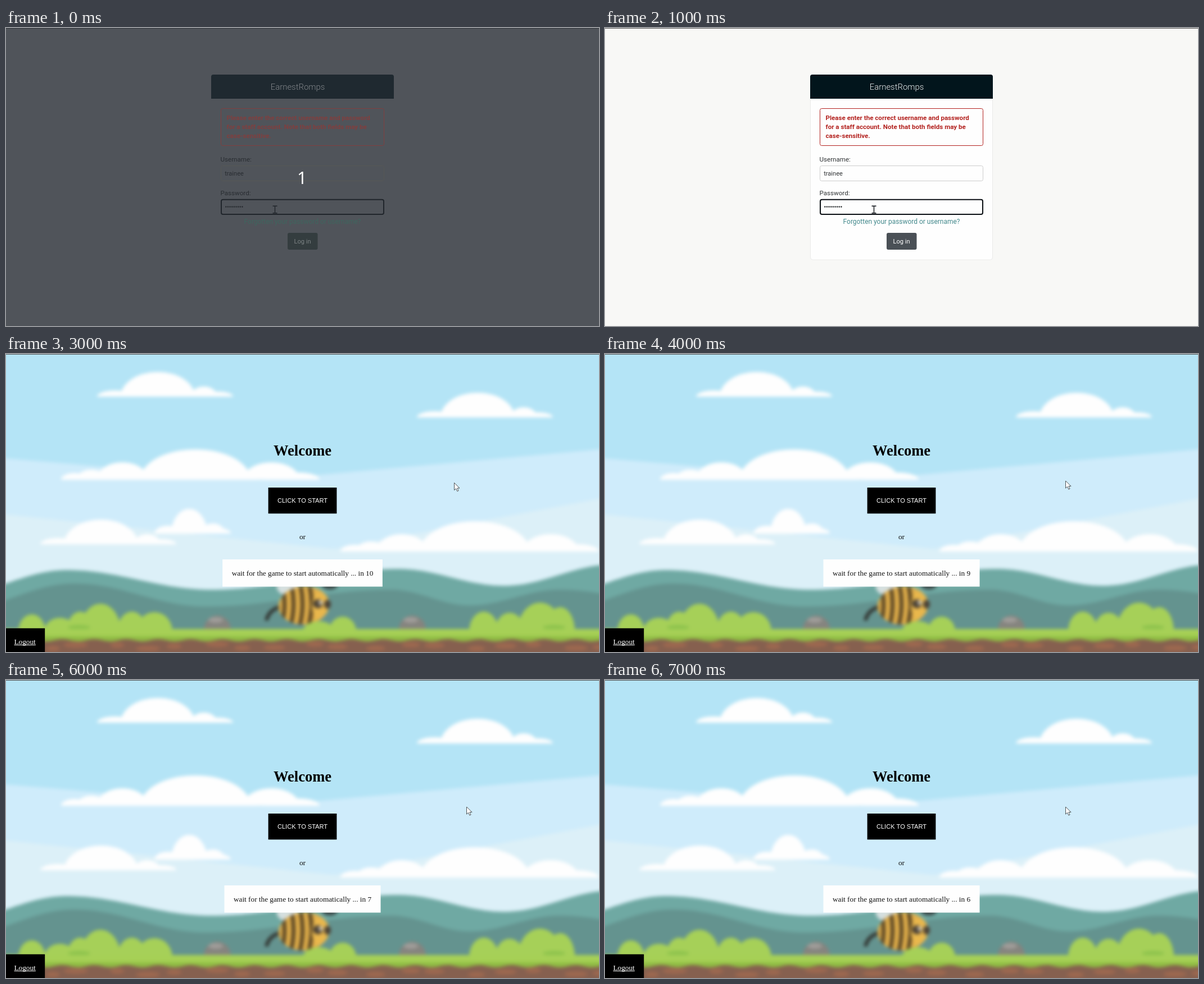
An HTML page with a canvas for the animation above (8000 ms loop, 1055x531 px).

```html
<!DOCTYPE html>
<html lang="en">
<head>
<meta charset="utf-8">
<title>Game login</title>
<style>
html, body { margin: 0; width: 100%; height: 100%; overflow: hidden; background: #fefefe; }
canvas { display: block; width: 1055px; height: 531px; }
</style>
</head>
<body>
<canvas id="stage" width="1055" height="531"></canvas>
<script>
const W = 1055, H = 531, MID = 527.5, LOOP = 8000, PAD = 16;
const ctx = document.getElementById('stage').getContext('2d');
const SANS = 'Roboto, sans-serif';
const SERIF = '"Liberation Serif", serif';

const LIGHT = {
  page: '#f8f8f6', card: '#fefefe', edge: '#ebebea', header: '#02151c', title: '#f2f4f4',
  error: '#b3221f', text: '#303335', link: '#43898c', button: '#4a5056', buttonText: '#fff',
  field: '#cccccc', focus: '#0b0f14', line: '#555'
};
const DIM = {
  page: '#50545a', card: '#50545a', edge: '#50545a', header: '#1f2930', title: '#83878b',
  error: '#803f3f', text: '#292d32', link: '#3f665f', button: '#343d3f', buttonText: '#7c8384',
  field: '#575855', focus: '#20252b', line: '#33373c'
};

function rect(c, color, x, y, w, h) {
  c.fillStyle = color;
  c.fillRect(x, y, w, h);
}

function round(x, y, w, h, r, fill, stroke, line = 1) {
  ctx.beginPath();
  ctx.roundRect(x, y, w, h, r);
  if (fill) { ctx.fillStyle = fill; ctx.fill(); }
  if (stroke) { ctx.strokeStyle = stroke; ctx.lineWidth = line; ctx.stroke(); }
}

function text(str, x, y, font, color, align = 'left') {
  ctx.font = font;
  ctx.fillStyle = color;
  ctx.textAlign = align;
  ctx.fillText(str, x, y);
}

function oval(c, color, x, y, rx, ry, turn = 0) {
  c.fillStyle = color;
  c.beginPath();
  c.ellipse(x, y, rx, ry, turn, 0, Math.PI * 2);
  c.fill();
}

// Fills everything below the curve y = f(x).
function ridge(c, color, f) {
  c.fillStyle = color;
  c.beginPath();
  c.moveTo(-PAD, H + PAD);
  for (let x = -PAD; x <= W + PAD; x += 3) c.lineTo(x, f(x));
  c.lineTo(W + PAD, H + PAD);
  c.fill();
}

// Cosine easing between crests and troughs.
function swell(...keys) {
  return x => {
    const i = Math.max(1, keys.findIndex(k => k[0] >= x));
    const [x0, y0] = keys[i - 1], [x1, y1] = keys[i];
    return y0 + (y1 - y0) * (1 - Math.cos(Math.PI * (x - x0) / (x1 - x0))) / 2;
  };
}

// A row of half ellipses [centre, half width, height] on one base line.
function puffs(c, color, dx, base, domes) {
  c.fillStyle = color;
  for (const [x, w, h] of domes) {
    c.beginPath();
    c.ellipse(x + dx, base, w, h, 0, Math.PI, Math.PI * 2);
    c.fill();
  }
}

function drawSky(c) {
  rect(c, '#b4e4f6', -PAD, -PAD, W + 2 * PAD, H + 2 * PAD);
  ridge(c, '#cfecfb', x => Math.min(186 + 0.085 * x, 170 + 0.091 * (W - x)));
  ridge(c, '#dcf0f8', x => Math.min(286 + 0.105 * x, 258 + 0.19 * (W - x)));

  const white = '#fefefe';
  const small = [[0, 66, 44], [-76, 32, 11], [82, 24, 18], [108, 26, 9]];
  const wide = [[0, 98, 54], [-130, 46, 31], [-185, 27, 18], [-215, 24, 12], [135, 50, 31], [183, 38, 13]];
  for (const [x, y] of [[270, 76], [839, 113], [169, 339]]) puffs(c, white, x, y, small);
  for (const [x, y] of [[337, 224], [834, 352]]) puffs(c, white, x, y, wide);
  puffs(c, white, 326, 320, [[0, 32, 44], [-38, 24, 14], [42, 22, 18], [58, 16, 9]]);
}

function drawBee(c) {
  oval(c, '#d5dfdf', 501, 415, 20, 16, 0.3);
  oval(c, '#3c4a4a', 576, 411, 14, 9);
  c.strokeStyle = '#343a36';
  c.lineCap = 'round';
  c.lineWidth = 7;
  c.beginPath();
  c.moveTo(487, 451);
  c.quadraticCurveTo(469, 456, 464, 472);
  c.stroke();

  c.save();
  c.beginPath();
  c.ellipse(530, 448, 45, 34, -0.08, 0, Math.PI * 2);
  c.clip();
  rect(c, '#e3b04a', 480, 405, 110, 90);
  c.strokeStyle = '#554224';
  c.lineWidth = 7;
  for (let x = 491; x < 550; x += 16) {
    c.beginPath();
    c.moveTo(x, 408);
    c.quadraticCurveTo(x + 10, 448, x - 2, 490);
    c.stroke();
  }
  oval(c, '#e9b74c', 562, 449, 18, 27);
  c.restore();

  oval(c, '#4a4034', 555, 445, 9, 8);
  oval(c, '#4a4136', 572, 446, 6, 8);
  oval(c, '#c9c2b2', 560, 443, 4, 4);
}

function drawLand(c) {
  ridge(c, '#6fa9a3', swell([-100, 430], [108, 385], [365, 420], [698, 383], [886, 413], [1080, 375]));
  ridge(c, '#64938f', swell([-100, 460], [122, 409], [355, 450], [685, 420], [825, 448], [985, 420], [1200, 445]));

  const bush = '#a6d058';
  puffs(c, bush, 0, 494, [[46, 24, 30], [96, 28, 24], [132, 24, 35], [168, 36, 49], [224, 26, 35], [264, 32, 34]]);
  puffs(c, bush, 920, 494, [[-70, 26, 35], [-24, 26, 33], [30, 40, 51], [66, 26, 43]]);
  for (const x of [130, 975]) oval(c, '#8cc24c', x, 487, 20, 4);
  for (const x of [376, 723]) {
    puffs(c, '#85847f', x, 491, [[0, 24, 25]]);
    oval(c, '#a09d9a', x - 3, 474, 13, 5);
  }
  drawBee(c);
  puffs(c, bush, 580, 494, [[-24, 28, 18], [19, 24, 26]]);

  ridge(c, '#a6d056', () => 490);
  ridge(c, '#8fbd43', () => 503);
  ridge(c, '#86604f', x => 510 + 2 * Math.sin(x * 0.11));
  for (let i = 0; i < 19; i++) {
    const x = 18 + i * 58 + 10 * Math.sin(i * 2.3);
    oval(c, '#9d684f', x, 521 + 4 * Math.sin(i * 1.9), 17 + 5 * Math.cos(i * 3), 5);
  }
}

function makeScenery() {
  const raw = document.createElement('canvas');
  raw.width = W + 2 * PAD;
  raw.height = H + 2 * PAD;
  const c = raw.getContext('2d');
  c.translate(PAD, PAD);
  drawSky(c);
  drawLand(c);

  const soft = document.createElement('canvas');
  soft.width = W;
  soft.height = H;
  const s = soft.getContext('2d');
  s.filter = 'blur(3.3px)';
  s.drawImage(raw, -PAD, -PAD);
  return soft;
}
const scenery = makeScenery();

function drawBeam(color) {
  ctx.strokeStyle = color;
  ctx.lineWidth = 1.4;
  ctx.stroke(new Path2D('M474.5 317.3h8M478.5 317.3v12.4M474.5 329.7h8'));
}

function drawArrow(x, y) {
  const path = new Path2D('M.5 .5V13.6L3.6 10.8L5.8 15.6L8 14.6L5.9 10H10Z');
  ctx.save();
  ctx.translate(x, y);
  ctx.fillStyle = '#fff';
  ctx.fill(path);
  ctx.strokeStyle = '#3a4146';
  ctx.lineWidth = 0.9;
  ctx.stroke(path);
  ctx.restore();
}

function drawLogin(p) {
  rect(ctx, p.page, 0, 0, W, H);
  round(365.5, 83.5, 324, 329.5, 4, p.card, p.edge);
  round(365, 83, 325, 43, [4, 4, 0, 0], p.header);
  text('EarnestRomps', 519, 110, `300 14.9px ${SANS}`, p.title, 'center');

  round(382.5, 143.5, 290, 66, 3, null, p.error);
  ['Please enter the correct username and password',
    'for a staff account. Note that both fields may be',
    'case-sensitive.'
  ].forEach((line, i) => text(line, 392.5, 164 + i * 16.2, `700 11.6px ${SANS}`, p.error));

  const label = `11.6px ${SANS}`, small = `11.05px ${SANS}`;
  text('Username:', 381.5, 237.5, label, p.text);
  round(382.5, 245.5, 290, 27, 3, null, p.field);
  text('trainee', 389.2, 263, small, p.text);

  text('Password:', 381.5, 297.5, label, p.text);
  round(383, 305.7, 289, 26.3, 3, null, p.focus, 2);
  for (let i = 0; i < 9; i++) oval(ctx, p.text, 391.3 + i * 3.63, 318.6, 1.3, 1.3);

  text('Forgotten your password or username?', MID, 349, `11.95px ${SANS}`, p.link, 'center');
  round(501, 365, 53.5, 30, 3, p.button);
  text('Log in', MID, 384, small, p.buttonText, 'center');
  drawBeam(p.focus);
}

function drawWelcome(count, decorated) {
  const body = `13.25px ${SERIF}`;
  rect(ctx, '#fefefe', 0, 0, W, H);
  if (decorated) ctx.drawImage(scenery, 0, 0);

  text('Welcome', MID, 181, `bold 26.5px ${SERIF}`, '#000', 'center');
  rect(ctx, '#000', 466.6, 238, 121.8, 46.3);
  text('CLICK TO START', MID, 265, '11.05px "Liberation Sans", sans-serif', '#fff', 'center');
  text('or', MID, 329.5, body, '#111', 'center');

  const notice = `wait for the game to start automatically ... in ${count}`;
  ctx.font = body;
  const w = ctx.measureText(notice).width + 33;
  rect(ctx, '#fefefe', MID - w / 2, 366, w, 48.5);
  text(notice, MID, 395, body, '#111', 'center');

  rect(ctx, '#000', 0, 488.7, 69.2, 43);
  text('Logout', 14.5, 517, body, '#fff');
  rect(ctx, '#fff', 14.5, 518, 38.3, 1);
}

function draw(t) {
  const sec = Math.floor(t / 1000);
  if (sec < 2) {
    drawLogin(sec ? LIGHT : DIM);
    if (!sec) text('1', 526.6, 278, '500 30px "Noto Sans", sans-serif', '#fff', 'center');
  } else if (sec < 3) {
    drawWelcome(10, false);
    drawBeam('#222');
  } else {
    drawWelcome(13 - sec, true);
    if (sec < 4) drawArrow(797, 229);
    else drawArrow(819, 225.5);
  }
  rect(ctx, sec ? LIGHT.line : DIM.line, 0, 0, W, 1);
}

function tick() {
  draw(performance.now() % LOOP);
  requestAnimationFrame(tick);
}
tick();
</script>
</body>
</html>
```
